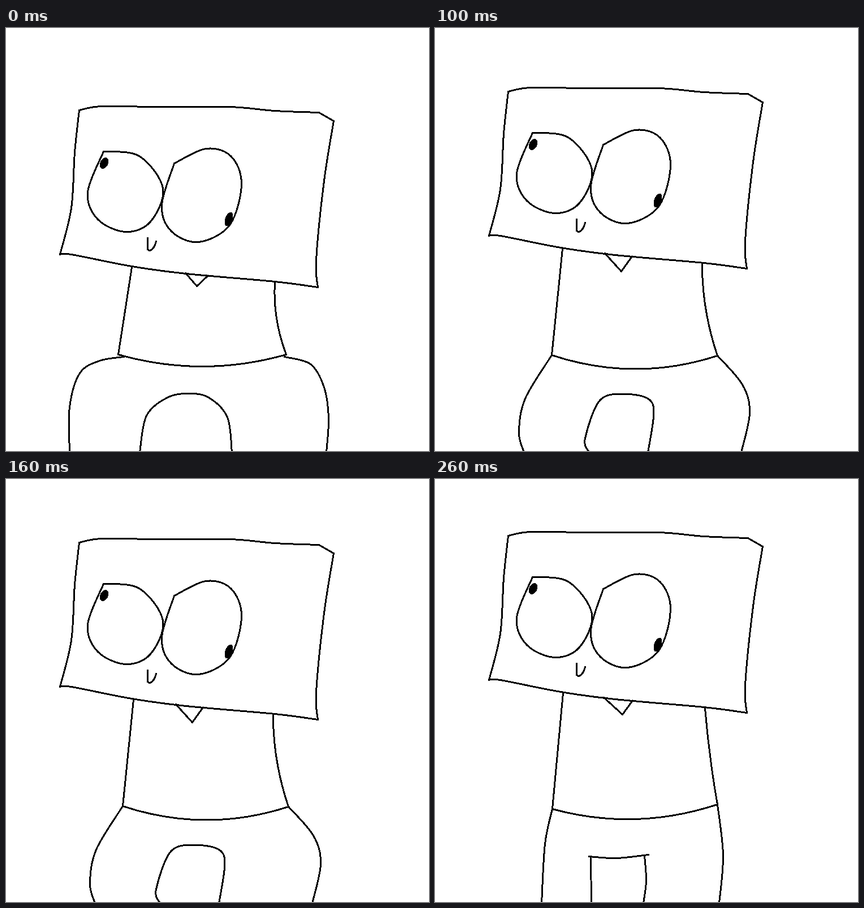
Recreate the animation shown at these times as an HTML page. Size 748 by 748 pixels, loop 300 ms.

```html
<!DOCTYPE html>
<html lang="en">
<head>
<meta charset="utf-8">
<title>Box-headed doodle</title>
<style>
  html, body { margin: 0; width: 100%; height: 100%; overflow: hidden; background: #fff; }
  svg { display: block; width: 100vw; height: 100vh; }
  path { fill: none; stroke: #000; stroke-width: 3; stroke-linecap: round; stroke-linejoin: round; }
  svg * { shape-rendering: crispEdges; }
</style>
</head>
<body>
<svg viewBox="0 0 748 748">
  <g id="stage" transform="translate(.5 .5)"></g>
</svg>
<script>
const STEP = 100;
const stage = document.getElementById('stage');

function add(parent, tag, attrs = {}) {
  const node = document.createElementNS('http://www.w3.org/2000/svg', tag);
  for (const name in attrs) node.setAttribute(name, attrs[name]);
  parent.append(node);
  return node;
}

// Smooth curve through a few key points
function curve(text) {
  const p = text.split(' ').map(s => s.split(',').map(Number));
  const at = i => p[Math.max(0, Math.min(p.length - 1, i))];
  let d = 'M' + p[0];
  for (let i = 0; i < p.length - 1; i++) {
    const [a, b, c, e] = [at(i - 1), at(i), at(i + 1), at(i + 2)];
    const c1 = b.map((v, k) => v + (c[k] - a[k]) / 6);
    const c2 = c.map((v, k) => v - (e[k] - b[k]) / 6);
    d += `C${c1} ${c2} ${c}`;
  }
  return d;
}

// Parabola from a to b whose middle is pushed aside by (dx, dy)
function bow(a, b, dx, dy) {
  const mid = [(a[0] + b[0]) / 2 + 2 * dx, (a[1] + b[1]) / 2 + 2 * dy];
  return `M${a}Q${mid} ${b}`;
}

const pupil = (x, y, rx, ry, tilt) =>
  add(head, 'ellipse', { rx, ry, transform: `translate(${x} ${y}) rotate(${tilt})` });

const head = add(stage, 'g');
const headLines = [
  '129,145 168,138 265,139 395,139 475,146 553,149', '553,149 579,164',
  '579,164 562,270 548,410 551,458',
  '551,458 475,448 318,434 222,421 115,400 95,400',
  '95,400 115,318 121,220 129,145',
  '172,218 235,226 277,283 255,342 211,360 162,338 144,290 172,218',
  '297,239 353,213 397,226 416,275 395,348 340,378 292,359 275,313 297,239',
  '250,371 250,391', '250,391 254,393 261,387 265,377'
];
for (const line of headLines) add(head, 'path', { d: curve(line) });
pupil(173, 238.5, 7, 10.5, 28);
pupil(393.5, 337.5, 6.5, 13, 20);

// neck: x at the chin; collar: both ends; bend: right neck side; mouth: left x, tip, right x
const poses = [
  {
    lift: 0, neck: [222, 475], collar: [[198, 577], [495, 577]], bend: -7, sag: 21,
    mouth: [317, [337, 456], 357],
    body: [
      '208,581 165,588 130,610 112,670 112,750',
      '492,581 538,594 562,635 570,690 566,750',
      '236,750 248,685 285,653 322,646 358,653 391,688 399,750'
    ]
  },
  {
    lift: -33, neck: [225, 472], collar: [[206, 578], [499, 579]], bend: -7, sag: 24,
    mouth: [300, [329, 430], 348],
    body: [
      '206,578 159,655 148,715 157,750',
      '499,579 543,630 556,680 541,750',
      '272,750 265,725 292,657 340,647 379,657 386,686 376,750'
    ]
  },
  {
    lift: -45, neck: [226, 477], collar: [[207, 583], [499, 575]], bend: -2, sag: 22,
    mouth: [298, [331, 416], 349],
    body: [
      '207,583 194,645 188,750', '499,575 509,665 502,750',
      '272,667 320,670 377,664', '275,667 276,750', '370,666 373,710 368,750'
    ]
  }
];

for (const pose of poses) {
  const { neck, collar, mouth } = pose;
  const chin = x => [x, 399 + 0.107 * x + pose.lift];
  const lines = [
    bow(chin(neck[0]), collar[0], 0, 0),
    bow(chin(neck[1]), collar[1], pose.bend, 0),
    bow(...collar, 0, pose.sag),
    `M${chin(mouth[0])}L${mouth[1]}L${chin(mouth[2])}`,
    ...pose.body.map(curve)
  ];
  pose.group = add(stage, 'g');
  for (const d of lines) add(pose.group, 'path', { d });
}

const start = performance.now();
function draw(now) {
  const current = poses[Math.floor(Math.max(0, now - start) / STEP) % poses.length];
  head.setAttribute('transform', `translate(0 ${current.lift})`);
  for (const pose of poses) pose.group.setAttribute('display', pose === current ? 'inline' : 'none');
  requestAnimationFrame(draw);
}
draw(start);
</script>
</body>
</html>
```
